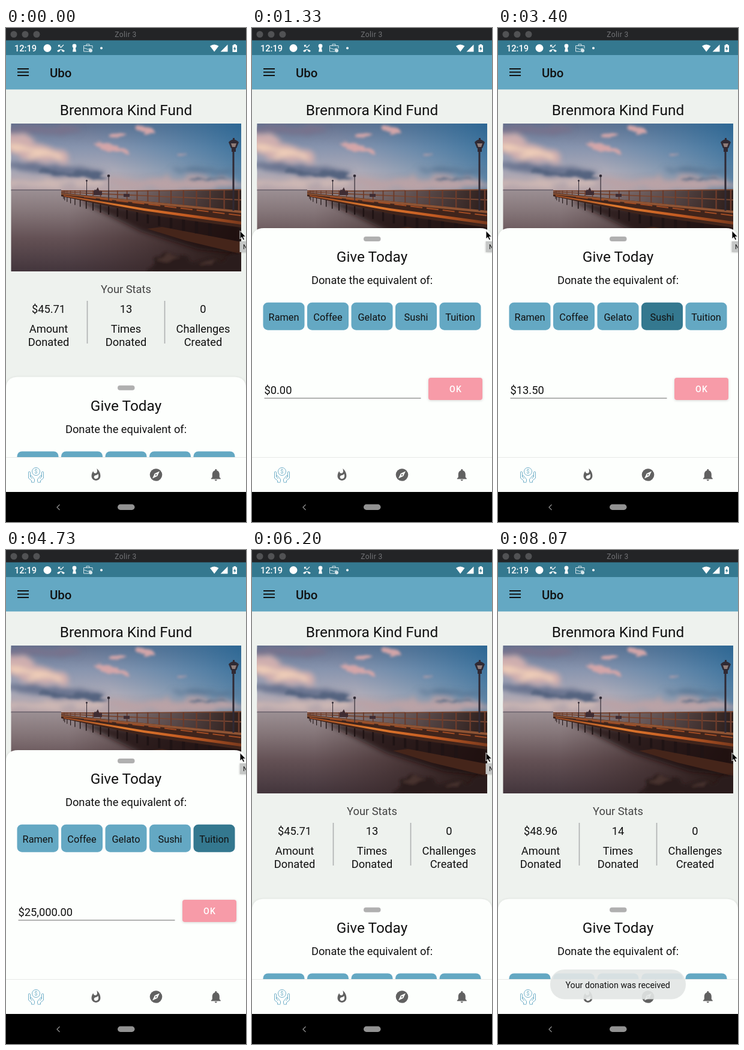
Animation, 400 px wide and 822 px high, one loop 8140 ms. Source, as an HTML page:

```html
<!DOCTYPE html>
<html lang="en">
<head>
<meta charset="utf-8">
<title>Donation screen</title>
<style>
html, body { margin: 0; width: 100%; height: 100%; overflow: hidden; background: #000; }
svg { display: block; width: 400px; height: 822px; font-family: Roboto, "Open Sans", sans-serif; }
text { fill: #111; }
.mid { text-anchor: middle; }
.head { font-size: 24.4px; }
.body { font-size: 18.3px; }
.medium { font-weight: 500; }
</style>
</head>
<body>
<svg viewBox="0 0 400 822">
  <defs>
    <linearGradient id="sky" x2="0" y2="1">
      <stop offset="0" stop-color="#626f8c"/><stop offset=".35" stop-color="#8794ae"/>
      <stop offset=".7" stop-color="#aaa9b7"/><stop offset="1" stop-color="#b9a5a8"/>
    </linearGradient>
    <linearGradient id="skyRight" x2="1" y2="-.2">
      <stop offset=".3" stop-color="#3d80ad" stop-opacity="0"/><stop offset="1" stop-color="#1f6494" stop-opacity=".85"/>
    </linearGradient>
    <linearGradient id="sea" x2="0" y2="1">
      <stop offset="0" stop-color="#9b8f93"/><stop offset=".25" stop-color="#86777a"/>
      <stop offset=".6" stop-color="#635054"/><stop offset="1" stop-color="#43353c"/>
    </linearGradient>
    <linearGradient id="seaRight">
      <stop offset=".25" stop-color="#3a2322" stop-opacity="0"/><stop offset="1" stop-color="#22130f" stop-opacity=".9"/>
    </linearGradient>
    <linearGradient id="beam">
      <stop offset="0" stop-color="#9a4a24"/><stop offset=".35" stop-color="#e07a2e"/>
      <stop offset=".7" stop-color="#c25a22"/><stop offset="1" stop-color="#7b3a1d"/>
    </linearGradient>
    <filter id="haze" x="-30%" y="-60%" width="160%" height="220%">
      <feTurbulence type="fractalNoise" baseFrequency=".02 .06" numOctaves="3" seed="4"/>
      <feDisplacementMap in="SourceGraphic" scale="24" xChannelSelector="R" yChannelSelector="G"/>
      <feGaussianBlur stdDeviation="4"/>
    </filter>
    <filter id="wisp" x="-30%" y="-60%" width="160%" height="220%">
      <feTurbulence type="fractalNoise" baseFrequency=".04 .09" numOctaves="3" seed="7"/>
      <feDisplacementMap in="SourceGraphic" scale="16" xChannelSelector="R" yChannelSelector="G"/>
      <feGaussianBlur stdDeviation="2"/>
    </filter>
    <filter id="soft" x="-30%" y="-60%" width="160%" height="220%"><feGaussianBlur stdDeviation="4"/></filter>
    <filter id="shade" x="-10%" y="-10%" width="120%" height="120%"><feDropShadow dx="0" dy="1" stdDeviation="2" flood-opacity=".16"/></filter>
    <clipPath id="photoClip"><path d="M8.500 159H392V405H8.500z"/></clipPath>
    <clipPath id="pageClip"><path d="M0 102H400V714H0z"/></clipPath>
  </defs>

  <rect width="400" height="822" fill="#eef2ee"/>
  <text class="mid head" x="200" y="144.500">Brenmora Kind Fund</text>

  <g clip-path="url(#photoClip)">
    <rect x="8" y="159" width="384" height="112" fill="url(#sky)"/>
    <rect x="8" y="159" width="384" height="112" fill="url(#skyRight)"/>
    <g filter="url(#haze)">
      <ellipse cx="50" cy="170" rx="75" ry="9" fill="#77728c"/>
      <ellipse cx="45" cy="202" rx="62" ry="17" fill="#cfaeae" transform="rotate(14 45 202)"/>
      <ellipse cx="48" cy="208" rx="46" ry="6" fill="#f0cfb8" transform="rotate(14 48 208)"/>
      <ellipse cx="85" cy="236" rx="85" ry="8" fill="#6b7490" transform="rotate(6 85 236)"/>
      <ellipse cx="80" cy="258" rx="110" ry="6" fill="#cdb7b4"/>
      <ellipse cx="290" cy="259" rx="130" ry="9" fill="#b9a2a6"/>
      <ellipse cx="335" cy="238" rx="60" ry="4" fill="#54718f"/>
    </g>
    <g filter="url(#wisp)" fill="#d3a5a8">
      <ellipse cx="176" cy="200" rx="30" ry="6" transform="rotate(14 176 200)"/>
      <ellipse cx="231" cy="170" rx="15" ry="6" transform="rotate(18 231 170)"/>
      <ellipse cx="187" cy="177" rx="13" ry="6"/>
      <ellipse cx="292" cy="210" rx="8" ry="2.500"/>
      <ellipse cx="115" cy="243" rx="58" ry="4" fill="#55647f" transform="rotate(5 115 243)"/>
      <ellipse cx="336" cy="251" rx="35" ry="2" fill="#5c6d86"/>
    </g>
    <rect x="8" y="270" width="384" height="135" fill="url(#sea)"/>
    <rect x="8" y="270" width="384" height="135" fill="url(#seaRight)"/>
    <path d="M8 268.800H92V270.300H8z" fill="#665e69"/>
    <path d="M120 286 392 326V375L320 368 225 338z" fill="#1d1110" opacity=".75" filter="url(#soft)"/>
    <path d="M235 334 260 331 392 356V376L300 354z" fill="#45251a"/>
    <g filter="url(#wisp)">
      <path d="M245 390q12-18 30-16 28 1 40 18l6 15h-85zM312 407q2-22 26-25l20 8 18-14q12-3 24 2v32z" fill="#2b1c1a"/>
      <path d="M252 388q12-14 27-12l10 6-18 5zM322 398q10-13 26-12l-8 9z" fill="#46332d"/>
    </g>
    <g id="piles" stroke="#1f1314"></g>
    <path d="M92 274 230 288 392 304V332L240 311 92 280z" fill="#40241b"/>
    <path d="M92 275 230 288 392 304V308L230 292 92 277z" fill="#8f5434"/>
    <path d="M96 278 230 300 392 322V327L230 304 96 280z" fill="url(#beam)"/>
    <path d="M130 281 260 296 392 312" fill="none" stroke="#a04c24" stroke-width="2" stroke-dasharray="20 7"/>
    <path d="M92 271 168 271.500 392 269M92 273 230 279 392 286" fill="none" stroke="#784733" stroke-width="1.800"/>
    <g id="posts" stroke="#6b3b2b"></g>
    <path d="M146 272q2-5 4-2l3-5 3 7 4-1v7h-14zM196 276h10v5h-10z" fill="#3f2c32"/>
    <g fill="#302a34">
      <path d="M377.500 200h3V304h-3zM371 190q8-9 17 0l-4 10h-9zM378 183h3v4h-3zM376 200h7v6h-7z"/>
      <path d="M375 192h9l-2 6h-5z" fill="#8f7c78"/>
      <path d="M170.500 246h1.200V289h-1.200zM134 254h1V279h-1z"/>
      <circle cx="171" cy="246" r="2.300"/><circle cx="134.500" cy="254" r="1.500"/>
    </g>
  </g>

  <g class="mid body">
    <text x="200" y="441" style="fill:#444">Your Stats</text>
    <text id="total" x="71" y="474"></text>
    <text id="times" x="200" y="474"></text>
    <text x="328.500" y="474">0</text>
    <text x="71" y="507">Amount</text><text x="71" y="528.500">Donated</text>
    <text x="200" y="507">Times</text><text x="200" y="528.500">Donated</text>
    <text x="328.500" y="507">Challenges</text><text x="328.500" y="528.500">Created</text>
  </g>
  <path d="M135.500 454V525M264.500 454V525" stroke="#b0b3b2" stroke-width="1.700"/>

  <g clip-path="url(#pageClip)">
    <g id="sheet">
      <path d="M0 420V20Q0 0 20 0H380Q400 0 400 20V420z" fill="#fdfffd" filter="url(#shade)"/>
      <rect x="186" y="14" width="28.500" height="8" rx="4" fill="#b0b0b0"/>
      <text class="mid head" x="200" y="56.400">Give Today</text>
      <text class="mid body" x="200" y="93.300">Donate the equivalent of:</text>
      <g id="choices" class="mid" font-size="16.300"></g>
      <text id="amount" class="body" x="20.500" y="275.500"></text>
      <path d="M20.500 283H281.500" stroke="#666" stroke-width="1.100"/>
      <rect x="294" y="249" width="90" height="37" rx="4" fill="#f79ba8" filter="url(#shade)"/>
      <rect id="press" x="294" y="249" width="90" height="37" rx="4" fill="#fff"/>
      <text class="mid medium" x="339.500" y="272.700" font-size="14.200" letter-spacing="1.250" style="fill:#fff">OK</text>
    </g>
  </g>

  <rect y="20" width="400" height="25.500" fill="#34788f"/>
  <rect y="45" width="400" height="57.300" fill="#64a8c3"/>
  <path d="M19 68H38M19 73.500H38M19 79H38" stroke="#111" stroke-width="2.100"/>
  <text class="medium" x="73" y="82" font-size="20.400">Ubo</text>
  <rect width="400" height="20.500" fill="#232426"/>
  <g fill="#515254"><circle cx="13" cy="10.500" r="5.500"/><circle cx="32" cy="10.500" r="5.500"/><circle cx="51" cy="10.500" r="5.500"/></g>
  <text class="mid" x="199.500" y="15" font-size="12" letter-spacing=".4" style="fill:#737477">Zolir 3</text>

  <g fill="#fff">
    <text class="medium" x="14" y="38.500" font-size="14.600" style="fill:#fff">12:19</text>
    <circle cx="69" cy="33.500" r="6.500"/>
    <path d="M85 38q6.500-5.500 13 0l-2 2-3-1.500v-1.700q-1.500-.5-3 0v1.700l-3 1.500z"/>
    <path d="M87.500 31.500V28.500h3M87.500 28.500l4 4 4.500-4.500" fill="none" stroke="#fff" stroke-width="1.100"/>
    <circle cx="114" cy="30" r="3.400"/><path d="M112.500 31h3l1.500 8.500h-6z"/>
    <path d="M138 39H129.500V29.500H144V34M134 29V27h5v2M129.500 33l7 2.500 5-2" fill="none" stroke="#d7e7ec"/>
    <circle cx="141" cy="37.500" r="3" fill="#d7e7ec"/>
    <circle cx="159" cy="33.500" r="2"/>
    <path d="M340 30q7-5 14.500 0L347.200 39.500zM369.500 27.500V39.500H357.500z"/>
    <path d="M377.500 28.500h2V27h3.500v1.500h2V40h-7.500z"/>
    <path d="M381.800 30.500 379 35h1.700v3.300l2.800-4.500h-1.700z" fill="#34788f"/>
  </g>

  <rect y="714" width="400" height="58.500" fill="#fdfffd"/>
  <path d="M0 714.500H400" stroke="#e7e9e7"/>
  <g fill="none" stroke="#64a8c3" stroke-width=".9">
    <circle cx="50" cy="738" r="6.500"/>
    <path id="palm" d="M47.500 755v-4l-5-6q-2-1-2 1l3 4M40.500 747v-8q-2.500-2-3 0v10l5 4v3h5"/>
    <use href="#palm" transform="matrix(-1 0 0 1 100 0)"/>
  </g>
  <text class="mid" x="50" y="741" font-size="8.500" style="fill:#64a8c3">$</text>
  <g fill="#616161">
    <path transform="translate(138.800 732.500) scale(.93)" d="M13.500.67s.74 2.650.74 4.800c0 2.060-1.350 3.730-3.410 3.730-2.070 0-3.630-1.670-3.630-3.730l.03-.36C5.210 7.510 4 10.620 4 14c0 4.420 3.580 8 8 8s8-3.580 8-8C20 8.610 17.410 3.800 13.500.67zM11.710 19c-1.780 0-3.220-1.400-3.220-3.140 0-1.620 1.050-2.760 2.810-3.120 1.770-.36 3.600-1.210 4.620-2.580.39 1.290.59 2.650.59 4.040 0 2.650-2.150 4.800-4.800 4.800z"/>
    <circle cx="250" cy="743.500" r="10.300"/>
    <path d="m256 737.500-3.800 8.200-8.200 3.800 3.800-8.200z" fill="#fdfffd"/><circle cx="250" cy="743.500" r="1.200"/>
    <path transform="translate(337.800 731.500)" d="M12 22c1.100 0 2-.9 2-2h-4c0 1.100.9 2 2 2zm6-6v-5c0-3.070-1.630-5.640-4.500-6.320V4c0-.83-.67-1.500-1.500-1.500s-1.500.67-1.500 1.500v.68C7.640 5.360 6 7.920 6 11v5l-2 2v1h16v-1l-2-2z"/>
  </g>

  <g id="toast">
    <rect x="87" y="698" width="226" height="49.500" rx="24" fill="#e3e6e5" fill-opacity=".91"/>
    <text class="mid" x="199.700" y="728.500" font-size="14.250">Your donation was received</text>
  </g>

  <rect y="772" width="400" height="50" fill="#000"/>
  <path d="M89.500 793 85 797.500 89.500 802" fill="none" stroke="#8b8b8b" stroke-width="1.300"/>
  <rect x="186" y="792.500" width="28.500" height="9.500" rx="4.700" fill="#929292"/>

  <g id="tooltip">
    <rect x="389.500" y="355" width="20" height="18" fill="#c5c7c6" filter="url(#shade)"/>
    <text x="395" y="367.500" font-size="10.500">N</text>
  </g>
  <path d="M390 337.500V351l3-2.800 2.200 4.800 2.300-1-2.100-4.700h4.200z" fill="#000" stroke="#fff" stroke-width=".9"/>
</svg>
<script>
const LOOP = 8140, CLOSED = 580.7, OPEN = 333;
const OPENING = [260, 700], CLOSING = [5560, 5960];
const OK_TAP = 5400, STATS_AT = 7260, TOAST = [7480, 7780], TOOLTIP_FADE = [7500, 8000];
const choices = ["Ramen", "Coffee", "Gelato", "Sushi", "Tuition"];
// [time, chosen button, amount]
const taps = [
  [0, -1, "$0.00"], [1560, 0, "$0.25"], [1980, 1, "$3.25"], [2420, 2, "$5.49"],
  [3080, 3, "$13.50"], [3900, 4, "$25,000.00"], [4900, 1, "$3.25"], [6000, -1, "$0.00"]
];

const $ = id => document.getElementById(id);
function add(parent, tag, attrs, text = "") {
  const node = document.createElementNS("http://www.w3.org/2000/svg", tag);
  for (const key in attrs) node.setAttribute(key, attrs[key]);
  node.textContent = text;
  parent.append(node);
  return node;
}

const buttons = choices.map((name, i) => {
  const x = 18.5 + i * 73.5;
  const box = add($("choices"), "rect", { x, y: 123.7, width: 69, height: 46, rx: 8 });
  add($("choices"), "text", { x: x + 34.5, y: 153.5 }, name);
  return box;
});

// Railing and piles spread apart towards the viewer.
for (let i = 0; i < 21; i++) {
  const u = i / 20, x = 96 + 292 * u ** 1.7;
  const deckY = 275 + 29 * (x - 92) / 300;
  add($("posts"), "path", { d: `M${x} 270V${deckY}`, "stroke-width": 0.8 + 1.8 * u });
  if (x < 355) {
    add($("piles"), "path", { d: `M${x} ${deckY + 3}v${6 + 42 * u}`, "stroke-width": 1 + 6 * u * u });
  }
}

const clamp = v => Math.min(1, Math.max(0, v));
const progress = (t, [from, to]) => clamp((t - from) / (to - from));
const ease = p => p * p * (3 - 2 * p);

function draw(t) {
  const lift = ease(progress(t, OPENING)) - ease(progress(t, CLOSING));
  $("sheet").setAttribute("transform", `translate(0 ${CLOSED + (OPEN - CLOSED) * lift})`);

  const [, chosen, amount] = taps.findLast(tap => t >= tap[0]);
  buttons.forEach((box, i) => box.setAttribute("fill", i === chosen ? "#34788f" : "#64a8c3"));
  $("amount").textContent = amount;
  $("press").setAttribute("opacity", t >= OK_TAP && t < OK_TAP + 160 ? 0.25 : 0);

  const donated = t >= STATS_AT;
  $("total").textContent = donated ? "$48.96" : "$45.71";
  $("times").textContent = donated ? "14" : "13";
  $("toast").setAttribute("opacity", progress(t, TOAST));
  $("tooltip").setAttribute("opacity", 1 - progress(t, TOOLTIP_FADE));
}

const start = performance.now();
function tick() {
  draw((performance.now() - start) % LOOP);
  requestAnimationFrame(tick);
}
tick();
</script>
</body>
</html>
```
